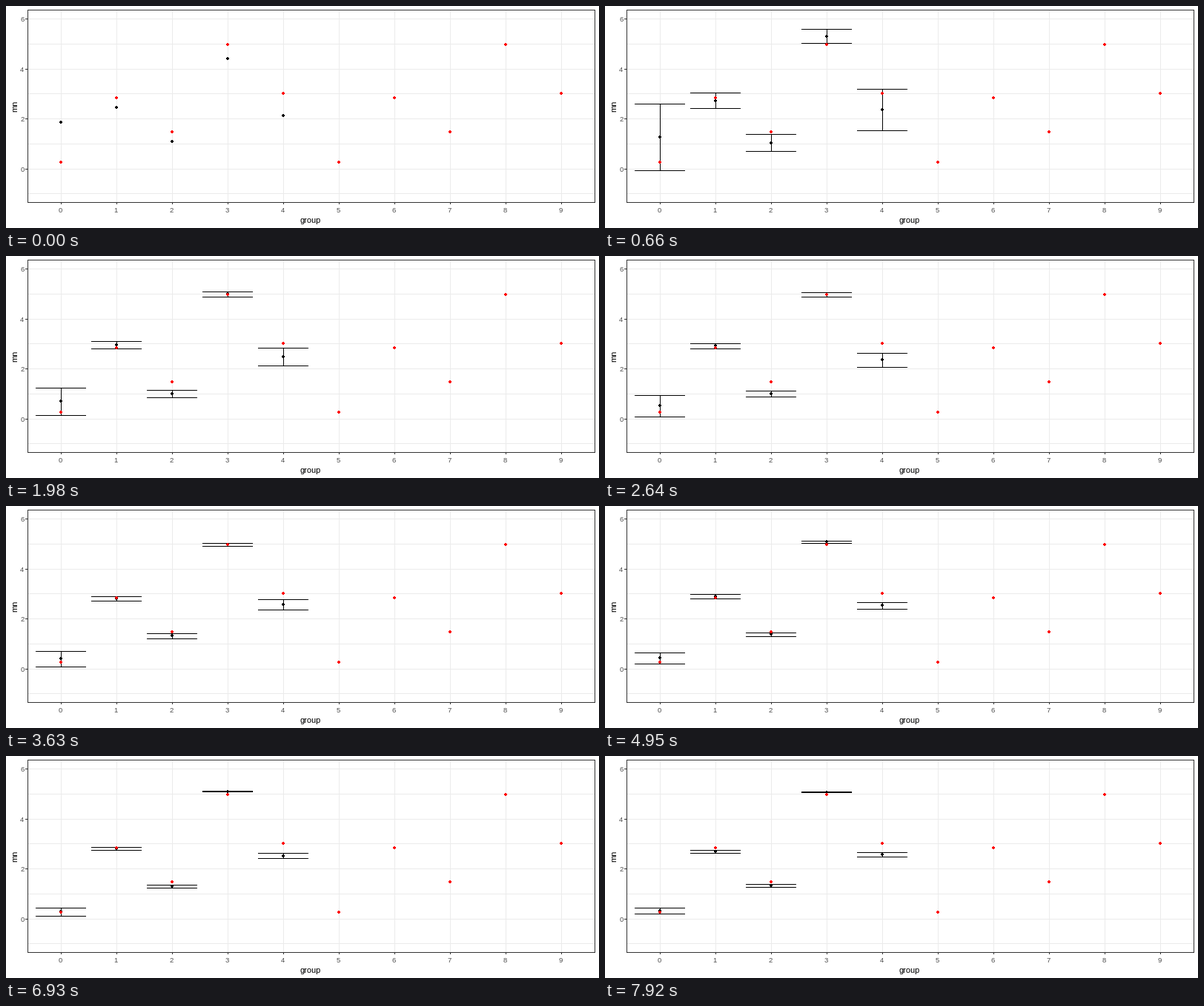
These frames come from a looping animation (800x300 px, 8 s). A matplotlib script:

```python
import numpy as np
import matplotlib.pyplot as plt
from matplotlib.animation import FuncAnimation
from matplotlib.collections import PolyCollection

W, H, DPI = 800, 300, 100
LOOP, STEP, HOLD = 8000, 20, 330      # ms: loop, redraw interval, time per state

plt.rcParams["font.family"] = "Liberation Sans"
fig = plt.figure(figsize=(W / DPI, H / DPI), dpi=DPI, facecolor="white")
ax = fig.add_axes([0, 0, 1, 1])
ax.set_xlim(0, W)
ax.set_ylim(H, 0)
ax.axis("off")

X = 74 + 75 * np.arange(10)
TRUE_Y = [211, 124, 170, 52, 118]

# Each group's mean drifts through a few key points; its whiskers shrink
# with the sample count n as a / n + b.
KEYS = [0, 1, 4, 8, 11, 15, 19, 24]
GROUPS = [
    ([157, 170, 190.5, 202.5, 206.5, 205.5, 211.5, 209], 139, -1.3),
    ([137, 132, 119, 121.5, 125, 122, 122, 129], 28.7, 0.8),
    ([183, 184, 186, 186, 175.5, 173.5, 177, 175], 34, 0.3),
    ([71, 36, 50.5, 52, 52, 48.5, 47, 48.7], 30, -0.6),
    ([148, 144, 131.5, 140.5, 133, 134.5, 136, 133], 86, -0.5),
]


def rect(x0, y0, x1, y1):
    return [(x0, y0), (x1, y0), (x1, y1), (x0, y1)]


def dot(x, y):
    """A round point four pixels across."""
    corner = [(1, 2), (1, 1), (2, 1)]
    pts = corner + [(a, -b) for a, b in corner[::-1]]
    return [(x + s * a, y + s * b) for s in (1, -1) for a, b in pts]


def shapes(verts, color, z):
    coll = PolyCollection(verts, facecolors=color, edgecolors="none",
                          linewidths=0, zorder=z)
    ax.add_collection(coll, autolim=False)
    return coll


def label(x, y, text, size, color, ha="center", **kw):
    ax.text(x, y, text, fontsize=size * 72 / DPI, color=color,
            ha=ha, va="baseline", **kw)


def px(v):
    return int(np.floor(v + 0.5))


def draw_panel():
    rows = [px(17.2 + 33.75 * i) for i in range(8)]
    grid = [rect(30, y, 794, y + 1) for y in rows]
    grid += [rect(x, 6, x + 1, 265) for x in X]
    shapes(grid, "#EBEBEB", 1)

    frame = [rect(29, 5, 795, 6), rect(29, 265, 795, 266),
             rect(29, 5, 30, 266), rect(794, 5, 795, 266)]
    frame += [rect(26, y, 29, y + 1) for y in rows[::2]]
    frame += [rect(x, 266, x + 1, 268) for x in X]
    shapes(frame, "#333333", 5)

    for i, x in enumerate(X):
        label(x - 0.7, 279, str(i), 9.5, "#4D4D4D")
    for y, text in zip(rows[::2], "6420"):
        label(24.5, y + 4, text, 9.5, "#4D4D4D", ha="right")
    label(411, 293, "group", 11, "black")
    label(15, 135.5, "mn", 11, "black", rotation=90, rotation_mode="anchor")


draw_panel()
black = shapes([], "black", 3)
shapes([dot(x, TRUE_Y[i % 5]) for i, x in enumerate(X)], "red", 4)


def update(i):
    k = (i * STEP + STEP // 2) // HOLD
    verts = []
    for x, (path, a, b) in zip(X, GROUPS):
        mean = np.interp(k, KEYS, path)
        if k:
            half = a / (k + 1) + b
            top, low = px(mean - half), px(mean + half)
            verts += [rect(x - 34, top, x + 34, top + 1),
                      rect(x - 34, low, x + 34, low + 1),
                      rect(x, top, x + 1, low)]
        verts.append(dot(x, px(mean - 0.1)))
    black.set_verts(verts)
    return [black]


anim = FuncAnimation(fig, update, frames=LOOP // STEP, interval=STEP,
                     init_func=lambda: update(0), repeat=True,
                     repeat_delay=0, blit=False)
plt.show()
```
